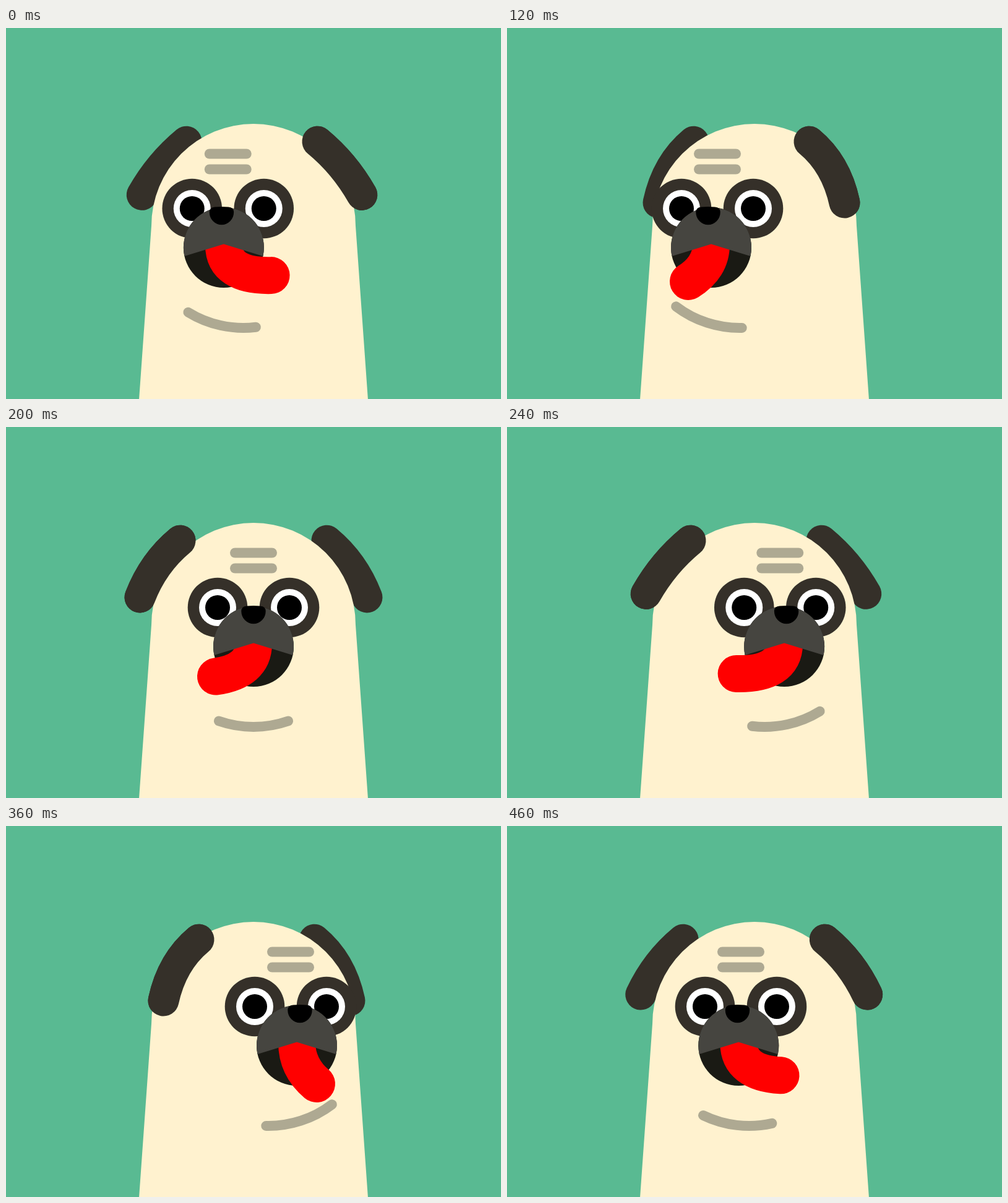
An HTML page with a canvas for the animation above (480 ms loop, 800 by 600 pixels).

```html
<!DOCTYPE html>
<html lang="en">
<head>
<meta charset="utf-8">
<title>Pug</title>
<style>
html, body { margin: 0; width: 100%; height: 100%; overflow: hidden; background: #59ba92; }
canvas { display: block; }
</style>
</head>
<body>
<canvas id="stage" width="800" height="600"></canvas>
<script>
const ctx = document.getElementById('stage').getContext('2d');
const LOOP = 480, HALF = 240, STEP = 20;
const CREAM = '#fff2cf', DARK = '#353029', FOLD = '#aea992';

const clamp = v => Math.min(1, Math.max(0, v));
const smooth = v => { v = clamp(v); return v * v * (3 - 2 * v); };
const mix = (a, b, k) => a + (b - a) * k;
const mixAll = (a, b, k) => a.map((v, i) => mix(v, b[i], k));

// Ear tips relative to the ear root: hanging, level, lifted
const EAR = [[57, 98.8], [65, 91.7], [78.5, 80.5]];

// Tongue poses: tip x, tip y, control y
const TONGUE = {
  left: [[-37, 410, 387], [-85, 397, 403]],
  right: [[32, 417, 390], [85, 397, 404]]
};

function disc(x, y, r, color) {
  ctx.fillStyle = color;
  ctx.beginPath();
  ctx.arc(x, y, r, 0, Math.PI * 2);
  ctx.fill();
}

function stroke(color, width, trace) {
  ctx.strokeStyle = color;
  ctx.lineWidth = width;
  ctx.lineCap = ctx.lineJoin = 'round';
  ctx.beginPath();
  trace();
  ctx.stroke();
}

function poseAt(time) {
  const t = (time + LOOP - 120) % LOOP;
  const toRight = t < HALF;
  const q = t % HALF;
  const side = toRight ? 1 : -1;
  const swap = clamp((q - 40) / 40);
  const [here, there] = toRight ? [TONGUE.left, TONGUE.right] : [TONGUE.right, TONGUE.left];
  return {
    turn: side * (2 * smooth(q / 160) - 1),
    tuck: q < 80 ? 1 - smooth(q / 80) : smooth((q - 80) / 80),
    tip: q < 80 ? mixAll(EAR[0], EAR[1], q / 80)
      : q < 160 ? mixAll(EAR[1], EAR[2], (q - 80) / 80)
      : mixAll(EAR[2], EAR[0], (q - 160) / 80),
    leftFront: toRight ? swap : 1 - swap,
    tongue: q < 160 ? mixAll(here[0], here[1], smooth(q / 160))
      : mixAll(here[1], there[0], smooth((q - 160) / 80))
  };
}

function ear(side, pose, alpha) {
  const inFront = side * pose.turn < 0;
  const root = 118.5 - (inFront ? 30 : 20) * pose.tuck;
  const [dx, dy] = pose.tip;
  const px = d => 400 + side * (root + d);
  ctx.globalAlpha = alpha;
  stroke(DARK, 50, () => {
    ctx.moveTo(px(0), 183.7);
    ctx.quadraticCurveTo(px(43.5), 219.7, px(dx), 183.7 + dy);
  });
  ctx.globalAlpha = 1;
}

function body() {
  ctx.fillStyle = CREAM;
  ctx.beginPath();
  ctx.moveTo(215, 601);
  ctx.lineTo(235, 320);
  ctx.arc(400, 320, 165, Math.PI, 0);
  ctx.lineTo(585, 601);
  ctx.fill();
}

function folds(turn) {
  const x = 400 + 60 * turn;
  for (const y of [203.5, 228.5]) {
    stroke(FOLD, 16, () => { ctx.moveTo(x - 30, y); ctx.lineTo(x + 30, y); });
  }
  const middle = Math.PI / 2 - turn * Math.PI / 10;
  stroke(FOLD, 16, () => ctx.arc(400 + 24 * turn, 315, 170, middle - 0.336, middle + 0.336));
}

function eyes(turn) {
  for (const dx of [-58, 58]) {
    const x = 400 + 60 * turn + dx;
    disc(x, 292, 48.3, DARK);
    disc(x, 292, 30, '#fff');
    disc(x, 292, 20, '#000');
  }
}

function muzzle(turn, [tipX, tipY, bendY]) {
  const x = 400 + 70 * turn;
  disc(x, 355, 65, '#1a1a14');
  stroke('#ff0000', 60, () => {
    ctx.moveTo(x, 350);
    ctx.quadraticCurveTo(x, bendY, x + tipX, tipY);
  });
  const lip = Math.asin(14 / 65);
  ctx.fillStyle = '#464540';
  ctx.beginPath();
  ctx.arc(x, 355, 65, Math.PI - lip, lip);
  ctx.lineTo(x, 349.5);
  ctx.fill();
}

function nose(turn) {
  const x = 400 + 75 * turn;
  ctx.fillStyle = '#000';
  ctx.beginPath();
  ctx.moveTo(x - 19.7, 298);
  ctx.quadraticCurveTo(x - 19.7, 290, x - 11, 289.4);
  ctx.quadraticCurveTo(x, 288.6, x + 11, 289.4);
  ctx.quadraticCurveTo(x + 19.7, 290, x + 19.7, 298);
  ctx.ellipse(x, 298, 19.7, 20.3, 0, 0, Math.PI);
  ctx.fill();
}

function draw(now) {
  const time = Math.floor((now + 0.5) / STEP) * STEP % LOOP;
  const pose = poseAt(time);
  ctx.fillStyle = '#59ba92';
  ctx.fillRect(0, 0, 800, 600);
  ear(-1, pose, 1);
  ear(1, pose, 1);
  body();
  ear(-1, pose, pose.leftFront);
  ear(1, pose, 1 - pose.leftFront);
  folds(pose.turn);
  eyes(pose.turn);
  muzzle(pose.turn, pose.tongue);
  nose(pose.turn);
  requestAnimationFrame(draw);
}
draw(0);
</script>
</body>
</html>
```
